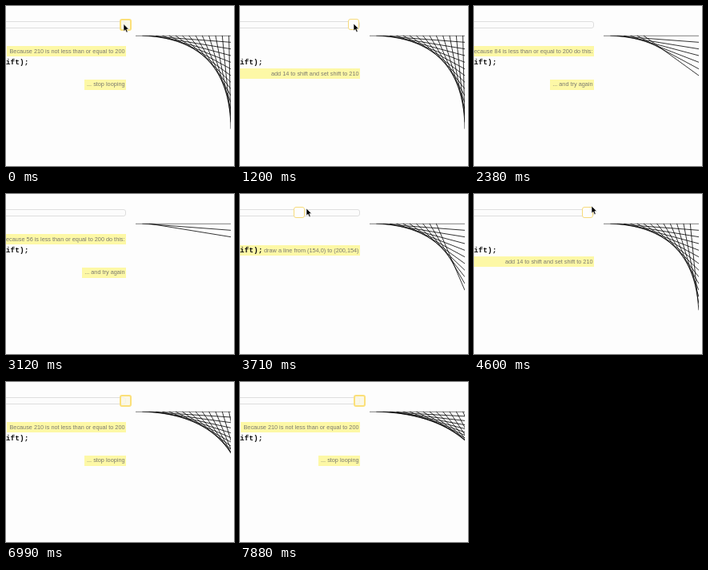
Recreate the animation shown at these times as an HTML page. Size 285x200 px, loop 8 s.

```html
<!DOCTYPE html>
<html lang="en">
<head>
<meta charset="utf-8">
<title>Stepping through a loop</title>
<style>
  html, body { margin: 0; width: 100%; height: 100%; overflow: hidden; background: #fdfdfd; }
  #stage { position: relative; width: 285px; height: 200px; overflow: hidden; }
  #stage > * { position: absolute; box-sizing: border-box; }
  #track { left: -20px; top: 19px; width: 170px; height: 9px; border: 1px solid #dedede; border-radius: 3px; background: #fcfcfc; }
  #handle { top: 16px; width: 14px; height: 14px; border: 1px solid #f6db7c; border-radius: 3px; background: #fefefe; }
  #handle.hover { width: 15px; height: 15px; border: 2px solid #fbe07a; background: #faf6e2d0; }
  .note {
    right: 135px; width: max-content; max-width: 159px; padding: 2.6px 1.5px 2.2px 3px;
    background: #fdf8a6; color: #7b7a70;
    font: 7.3px/8.4px "Liberation Sans", Arial, sans-serif; text-align: right;
  }
  .row { width: 160px; max-width: none; }
  #code { right: 256.5px; top: 65px; font: bold 9.6px/12px "Liberation Mono", monospace; color: #111; white-space: pre; }
  #test { top: 50px; }
  #draw { top: 64px; }
  #add { top: 78px; }
  #next { top: 91.5px; }
  svg { left: 0; top: 0; }
</style>
</head>
<body>
<div id="stage">
  <div id="track"></div>
  <div id="handle"></div>
  <div id="draw" class="note row"></div>
  <div id="add" class="note row"></div>
  <div id="code">shift);</div>
  <div id="test" class="note"></div>
  <div id="next" class="note"></div>
  <svg width="285" height="200">
    <clipPath id="paper"><rect x="162" y="36.8" width="119" height="120"/></clipPath>
    <g clip-path="url(#paper)"><path id="lines" fill="none" stroke="#000" stroke-width=".8"/></g>
    <path id="cursor" d="M0 0V9L2.1 7.2 3.6 10.6 5.2 9.9 3.8 6.6H6.5Z" stroke="#fff" stroke-width=".6"/>
  </svg>
</div>
<script>
  const LOOP = 8000, TICK = 148.4;
  const STEP = 14, LIMIT = 200, LAST = 45;
  const LEFT = 162, TOP = 37, SCALE = 0.595;
  const $ = id => document.getElementById(id);

  // Steps back from the end of the program while the slider is dragged, one per tick.
  const DRAG_START = 8;
  const drag = [1, 2, 4, 6, 9, 14, 19, 25, 27, 31, 35, 38, 38,
                33, 25, 18, 13, 11, 11, 10, 9, 6, 3, 1];
  const programStep = tick => LAST - (drag[tick - DRAG_START] || 0);

  // Pointer tips: [first tick, y, x per tick...]
  const sweeps = [
    [8, 22, 142, 132, 110, 88, 50, 20, 2],
    [22, 18, 27, 55, 70, 83, 82, 84],
    [28, 15, 108, 128, 140, 147, 150, 152]
  ];

  function pointer(tick) {
    if (tick < DRAG_START) return [tick < 1 ? 147 : 146.3, 22.5];
    for (const [first, y, ...xs] of sweeps) {
      if (tick >= first && tick < first + xs.length) return [xs[tick - first], y];
    }
    return null;
  }

  // The end point is pulled right in two moves with a short rest between.
  function lineEnd(tick) {
    const firstMove = Math.min(3, Math.max(0, tick - 41));
    const secondMove = Math.max(0, tick - 45);
    return LIMIT + (firstMove + secondMove) * 80 / 11;
  }

  function note(id, text) {
    $(id).textContent = text;
    $(id).style.display = text ? "" : "none";
  }

  function showNotes(step) {
    const shift = Math.floor(step / 3) * STEP, phase = step % 3;
    const done = shift > LIMIT;
    const test = done
      ? `Because ${shift} is not less than or equal to ${LIMIT}`
      : `Because ${shift} is less than or equal to ${LIMIT} do this:`;
    note("test", phase === 0 ? test : "");
    note("next", phase === 0 ? (done ? "... stop looping" : "... and try again") : "");
    note("draw", phase === 1 ? `draw a line from (${shift},0) to (${LIMIT},${shift})` : "");
    note("add", phase === 2 ? `add ${STEP} to shift and set shift to ${shift + STEP}` : "");
  }

  function showLines(step, end) {
    const count = Math.floor((step + 2) / 3);
    let d = "";
    for (let i = 0; i < count; i++) {
      const shift = i * STEP;
      d += `M${LEFT + shift * SCALE} ${TOP}L${LEFT + end * SCALE} ${TOP + shift * SCALE}`;
    }
    $("lines").setAttribute("d", d);
  }

  function render(tick) {
    const step = programStep(tick);
    showNotes(step);
    // The drawing trails the slider by one tick.
    showLines(programStep(tick - 1), lineEnd(tick));
    $("handle").style.left = 142 - (LAST - step) * 6.8 + "px";
    $("handle").className = step === LAST ? "hover" : "";
    const tip = pointer(tick);
    $("cursor").style.display = tip ? "" : "none";
    if (tip) $("cursor").setAttribute("transform", `translate(${tip})`);
  }

  let shown = -1;
  const start = performance.now();
  function play() {
    const time = (performance.now() - start) % LOOP;
    const tick = Math.min(53, Math.floor((time + 1) / TICK));
    if (tick !== shown) render(shown = tick);
    requestAnimationFrame(play);
  }
  play();
</script>
</body>
</html>
```
